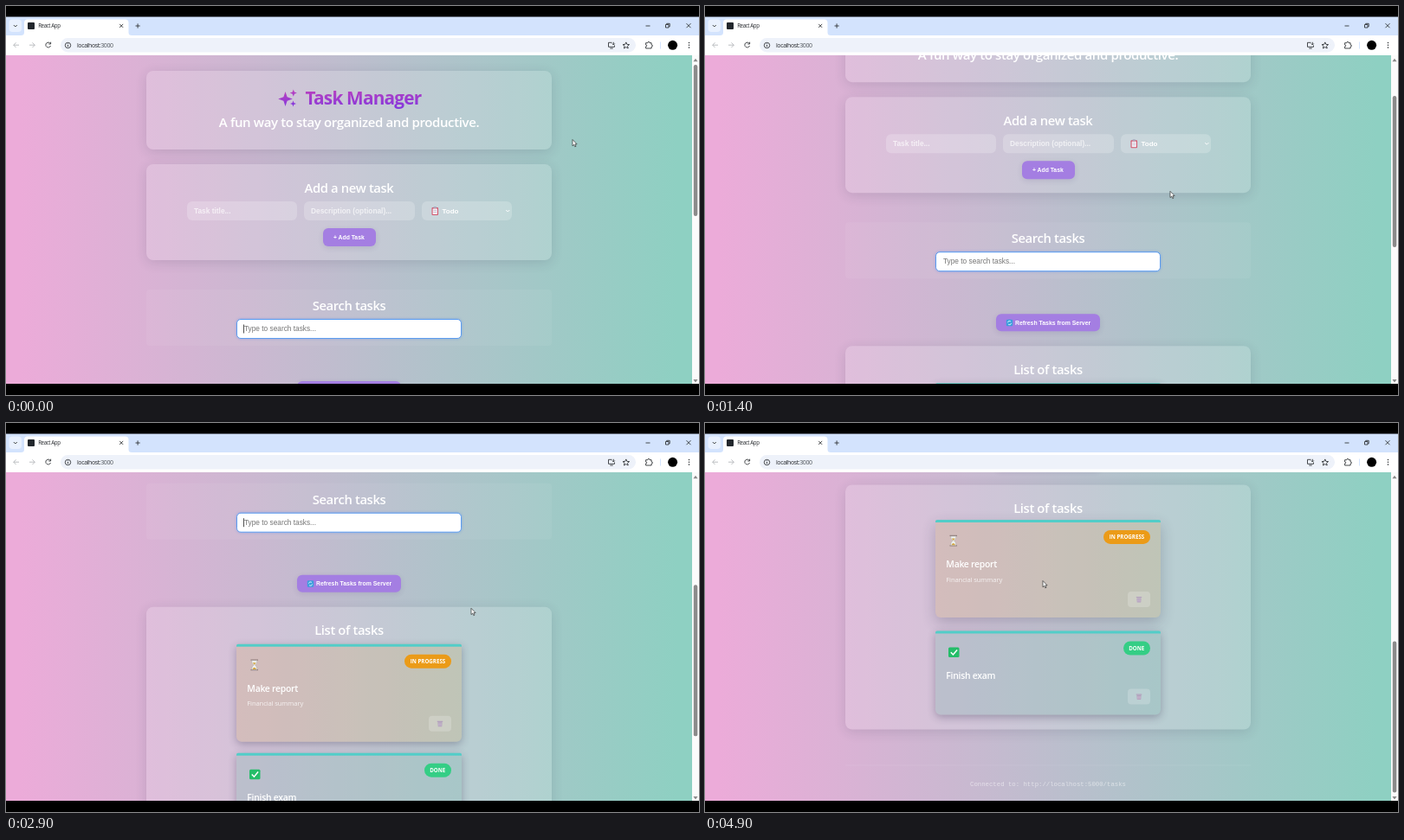
These frames come from a looping animation (800x450 px, 5 s). An HTML page:

```html
<!DOCTYPE html>
<html lang="en">
<head>
<meta charset="utf-8">
<title>Task Manager</title>
<style>
  html, body { margin: 0; width: 100%; height: 100%; overflow: hidden; background: #000; }
  div, svg { position: absolute; }
  svg { left: 0; top: 0; overflow: visible; }
  #stage { left: 0; top: 0; width: 800px; height: 450px; overflow: hidden; }
  #view { left: 0; top: 57px; width: 792px; height: 380px; overflow: hidden;
          background: linear-gradient(90deg, #ecabd9 2%, #8ed0c2 98%); }
  #page { left: 0; top: -57px; width: 792px; height: 837px; }
  .card { left: 162px; width: 468px; border-radius: 8px; background: rgba(255,255,255,.16);
          box-shadow: 0 3px 14px rgba(40,40,70,.14); }
  .soft { background: rgba(255,255,255,.05); box-shadow: none; border-radius: 4px; }
  .field { top: 226px; height: 22px; border-radius: 6px; background: rgba(255,255,255,.2); }
  .btn { border-radius: 6px; background: #a47ee2; box-shadow: 0 2px 6px rgba(60,40,110,.12); }
  .search { left: 266px; top: 362px; width: 258px; height: 20.5px; border: 1px solid #5b9cf0;
            border-radius: 5px; background: #fff; box-shadow: 0 0 3px rgba(70,130,240,.45); }
  .task { left: 266px; width: 260px; border-radius: 2px 2px 6px 6px;
          box-shadow: 0 3px 10px rgba(50,45,75,.32); }
  .bar { left: 0; top: 0; width: 100%; height: 2.5px; border-radius: 2px 2px 0 0;
         background: linear-gradient(90deg, #ec5560 30%, #52cdc8 48%) 100% 0 / 200% 100%; }
  .badge { right: 12px; top: 12px; height: 15.5px; border-radius: 8px; }
  .bin { right: 12px; bottom: 12px; width: 26px; height: 18px; border-radius: 4px;
         background: rgba(255,255,255,.2); }
  .ui { font-family: "Open Sans", "Noto Sans", sans-serif; letter-spacing: -.025em; }
  .arial { font-family: "Liberation Sans", Arial, sans-serif; }
  .mid { text-anchor: middle; }
  .h2 { font-size: 14.8px; font-weight: 600; }
  .b { font-weight: 700; }
  .line { fill: none; stroke: #333639; stroke-width: .9; }
</style>
</head>
<body>
<div id="stage">
  <div id="view">
    <div id="page">
      <div class="card" style="top:74.5px;height:91.5px"></div>
      <div class="card" style="top:183px;height:111px"></div>
      <div class="field" style="left:209px;width:127px"></div>
      <div class="field" style="left:344px;width:127.5px"></div>
      <div class="field" style="left:479.5px;width:104.5px"></div>
      <div class="btn" style="left:365.5px;top:257px;width:61.5px;height:20.5px"></div>
      <div class="card soft" style="top:328px;height:64.5px"></div>
      <div class="search"></div>
      <div class="btn" style="left:336px;top:434.3px;width:120px;height:19.5px"></div>
      <div class="card" style="top:470.5px;height:283.5px"></div>
      <svg width="792" height="837" fill="#fff">
        <defs>
          <linearGradient id="violet" x1="0" y1="0" x2=".15" y2="1">
            <stop offset=".15" stop-color="#bc40bd"/><stop offset="1" stop-color="#8638dc"/>
          </linearGradient>
        </defs>
        <path fill="url(#violet)" d="M322.5 99l2.1 6.2 6.2 2.3-6.2 2.3-2.1 6.2-2.1-6.2-6.2-2.3 6.2-2.3z
          M331.8 96.5l1.1 3 3 1.1-3 1.1-1.1 3-1.1-3-3-1.1 3-1.1z M331.5 109.5l.9 2.6 2.6 .9-2.6 .9-.9 2.6-.9-2.6-2.6-.9 2.6-.9z"/>
        <text class="ui b" x="345.5" y="113.6" fill="url(#violet)" style="font-size:20.8px;letter-spacing:-.038em">Task Manager</text>
        <text class="ui mid" x="396" y="139.5" font-size="15" font-weight="600">A fun way to stay organized and productive.</text>
        <g class="ui mid h2">
          <text x="396" y="216">Add a new task</text>
          <text x="396" y="352">Search tasks</text>
          <text x="396" y="503.5">List of tasks</text>
        </g>
        <g class="arial b" font-size="8.35">
          <text x="217" y="240" fill-opacity=".68">Task title...</text>
          <text x="352" y="240" fill-opacity=".68">Description (optional)...</text>
          <text x="503.5" y="240" font-size="8">Todo</text>
          <text x="378" y="269.5" font-size="6.8">+ Add Task</text>
          <text x="358" y="446.8" font-size="6.9">Refresh Tasks from Server</text>
        </g>
        <g>
          <rect x="491.5" y="233" width="7.5" height="9" rx="1" fill="#d0566c"/>
          <rect x="492.6" y="234.4" width="5.3" height="6.6" fill="#f3eef5"/>
          <rect x="493.6" y="232" width="3.3" height="2" rx=".6" fill="#a9a9bd"/>
          <path d="M493.5 236.5h3.5M493.5 238.5h3.5" stroke="#b5a7bd" stroke-width=".6"/>
          <path d="M577.3 236l2 2 2-2" fill="none" stroke="#fff"/>
        </g>
        <rect x="347.8" y="440.6" width="7.4" height="7.4" rx="1.2" fill="#3c9fdc"/>
        <path d="M349.5 444a2 2 0 0 1 3.6-1M353.5 444.7a2 2 0 0 1-3.6 1" fill="none" stroke="#e6f5ff" stroke-width=".9"/>
        <text class="arial" x="275" y="376" font-size="8.3" fill="#757575">Type to search tasks...</text>
        <rect id="caret" x="274" y="368.5" width=".8" height="10" fill="#222"/>
        <path d="M162 795.5h468" stroke="#fff" stroke-opacity=".07"/>
        <text class="mid" x="396" y="819.5" font-size="7.32" fill-opacity=".55"
          font-family="'Liberation Mono', 'Courier New', monospace">Connected to: http://localhost:5000/tasks</text>
      </svg>
    </div>
  </div>

  <svg width="800" height="450">
    <path d="M0 0h800v12.5H0zM0 437h800v13H0z"/>
    <path d="M0 12.5h800V34H0z" fill="#d3e3fd"/>
    <path d="M0 34h800v23H0z" fill="#fff"/>
    <path d="M17.5 34q3.5 0 3.5-3.5V19.500q0-4 4-4h112.500q4 0 4 4V30.500q0 3.500 3.500 3.500z" fill="#fff"/>
    <rect x="3.500" y="15.500" width="14.500" height="14.500" rx="4" fill="#e9f1fe"/>
    <rect x="25" y="19" width="8" height="8" rx="1" fill="#22272d"/>
    <rect x="63" y="37" width="664" height="16.500" rx="8.250" fill="#eef2fa"/>
    <path class="line" d="M8.800 22l2 2 2-2M131.200 20.900l4 4m0-4l-4 4M149.500 23h5.200m-2.600-2.600v5.200
      M738.500 23h5M785.500 20.200l5 5m0-5l-5 5"/>
    <path class="line" d="M761.500 21.500h3.500v3.500h-3.500zM762.700 21.300v-1h3.500v3.500h-1"/>
    <path class="line" style="stroke:#b4b7ba" d="M15 45.200H8.800m2.800-2.900l-2.900 2.900 2.900 2.900M27 45.200h6.200m-2.800-2.900l2.900 2.900-2.900 2.900"/>
    <path class="line" d="M51.300 43.600a2.900 2.900 0 1 0 .2 2.400M51.600 41.700v2.300h-2.300"/>
    <circle cx="71.500" cy="45.500" r="3.200" class="line"/>
    <path class="line" d="M71.500 45v2.200M71.500 43.400v.8"/>
    <path class="line" d="M699.500 42.300h-4v5h7v-1.800M697.300 49h3.400M701.300 41.800v3m-1.500-1.300l1.500 1.500 1.500-1.500"/>
    <path class="line" d="M715.800 41.900l1.100 2.500 2.700.2-2.100 1.800.7 2.600-2.400-1.400-2.400 1.400.7-2.600-2.100-1.800 2.700-.2z"/>
    <path class="line" d="M738.600 42.700h2.200q0-1.400 1.100-1.400t1.100 1.400h2.100v2.200q1.300 0 1.300 1.100t-1.300 1.100v1.900h-6.500v-2.200q1.200 0 1.200-.9t-1.200-.9z"/>
    <path d="M755.500 41.500v8" stroke="#d3e3fd"/>
    <circle cx="769.600" cy="45.300" r="5.500"/>
    <g fill="#333639"><circle cx="788.500" cy="42.500" r=".8"/><circle cx="788.500" cy="45.300" r=".8"/><circle cx="788.500" cy="48.100" r=".8"/></g>
    <g class="ui" fill="#24272b">
      <text x="37.200" y="25.300" font-size="6.2">React App</text>
      <text x="82" y="47.900" font-size="7">localhost<tspan fill="#4c5157">:3000</tspan></text>
    </g>
    <path d="M792 57h8v380h-8z" fill="#fbfbfb"/>
    <path d="M793.400 64.300l2.600-3.600 2.600 3.600zM793.400 432l2.600 3.600 2.600-3.600z" fill="#8a8a8a"/>
    <rect id="thumb" x="793.800" y="68" width="4.500" height="175" rx="2.200" fill="#8b8b8b"/>
    <path id="cursor" d="M0 0v7.300l1.700-1.500 1.100 2.500 1.200-.5-1.100-2.500h2.200z" fill="#fff" stroke="#222" stroke-width=".65"/>
  </svg>
</div>

<script>
const LOOP = 5000, STEP = 100, BLINK = 530;
const $ = id => document.getElementById(id);

const hourglass = `<path d="M16.500 18.500h8.500M16.500 30h8.500" stroke="#8d7b78" stroke-width="1.300"/>
  <path d="M17.500 19h6.500q0 3.500-2.500 5.200q2.500 1.800 2.500 5.300h-6.500q0-3.500 2.500-5.300q-2.500-1.700-2.500-5.200z" fill="#eef1ee" stroke="#a9a5a5" stroke-width=".5"/>
  <path d="M18.700 21.500h4l-2 2.500zM18.500 29.300q.5-2 2.200-2.300 1.800.3 2.300 2.300z" fill="#d3a644"/>`;
const check = `<rect x="15" y="19" width="12.500" height="11.500" rx="1.500" fill="#25bd69"/>
  <path d="M17.800 24.800l2.600 2.700 4.700-5.600" fill="none" stroke="#fff" stroke-width="1.500"/>`;

function addTask({ top, height, tint, icon, label, badge, width, color, note = "" }) {
  const el = document.createElement("div");
  el.className = "task";
  el.style.cssText = `top:${top}px;height:${height}px;background:${tint}`;
  const by = height - 24;
  el.innerHTML = `<div class="bar"></div>
    <div class="badge" style="width:${width}px;background:${color}"></div><div class="bin"></div>
    <svg width="260" height="${height}" fill="#fff">${icon}
      <text class="ui" x="12.300" y="55.500" font-size="10.400" font-weight="600">${label}</text>
      <text class="ui" x="12.300" y="71.700" font-size="7.700" fill-opacity=".8" style="letter-spacing:-.02em">${note}</text>
      <text class="ui b mid" x="${248 - width / 2}" y="22.100" font-size="6.200" style="letter-spacing:0">${badge}</text>
      <g transform="translate(231.800 ${by})" fill="#b3a0bd">
        <path d="M0 0h6.400v1.200H0zM.6 1.600h5.200l-.4 5H1z"/>
        <path d="M2.200 2.500v3.300M4.200 2.500v3.300" stroke="#ded4e2" stroke-width=".6"/></g>
    </svg>`;
  $("page").append(el);
  return el;
}

const report = addTask({ top: 514, height: 113, tint: "rgba(205,160,80,.21)", icon: hourglass,
  label: "Make report", note: "Financial summary", badge: "IN PROGRESS", width: 54, color: "#eb9b18" });
addTask({ top: 640.3, height: 97, tint: "rgba(110,175,165,.24)", icon: check,
  label: "Finish exam", badge: "DONE", width: 31.500, color: "#34ce85" });

// Each track is a list of [time, value], linear in between.
const tracks = {
  scroll: [[400, 0], [1100, 58], [2100, 124], [2900, 258.300], [3500, 356], [3770, 399.500]],
  x: [[0, 654], [200, 537], [4000, 537], [4700, 390]],
  y: [[0, 154.500], [200, 214.300], [4000, 214.300], [4700, 182.500]],
  bar: [[2900, 100], [3500, 10], [3800, 0], [4100, 10], [4700, 100]],
  lift: [[4050, 0], [4350, 1]]
};

function at(keys, t) {
  if (t <= keys[0][0]) return keys[0][1];
  for (let i = 1; i < keys.length; i++) {
    const [t0, a] = keys[i - 1], [t1, b] = keys[i];
    if (t < t1) return a + (b - a) * (t - t0) / (t1 - t0);
  }
  return keys[keys.length - 1][1];
}

const bars = document.querySelectorAll(".bar");

function draw(t) {
  const { scroll, x, y, bar, lift } =
    Object.fromEntries(Object.entries(tracks).map(([k, keys]) => [k, at(keys, t)]));
  $("page").style.transform = `translateY(${-scroll}px)`;
  $("thumb").setAttribute("y", 68 + scroll * .462);
  $("cursor").setAttribute("transform", `translate(${x} ${y})`);
  $("caret").style.visibility = (t + 510) % (2 * BLINK) < BLINK ? "visible" : "hidden";
  bars.forEach(b => b.style.backgroundPosition = `${bar}% 0`);
  report.style.transform = `translateY(${-2.600 * lift}px)`;
  report.style.boxShadow = `0 ${3 + 3 * lift}px ${10 + 6 * lift}px rgba(50,45,75,${.32 - .08 * lift})`;
}

const start = performance.now();
function tick() {
  const t = (performance.now() - start) % LOOP;
  draw(Math.floor(t / STEP) * STEP);
  requestAnimationFrame(tick);
}
tick();
</script>
</body>
</html>
```
